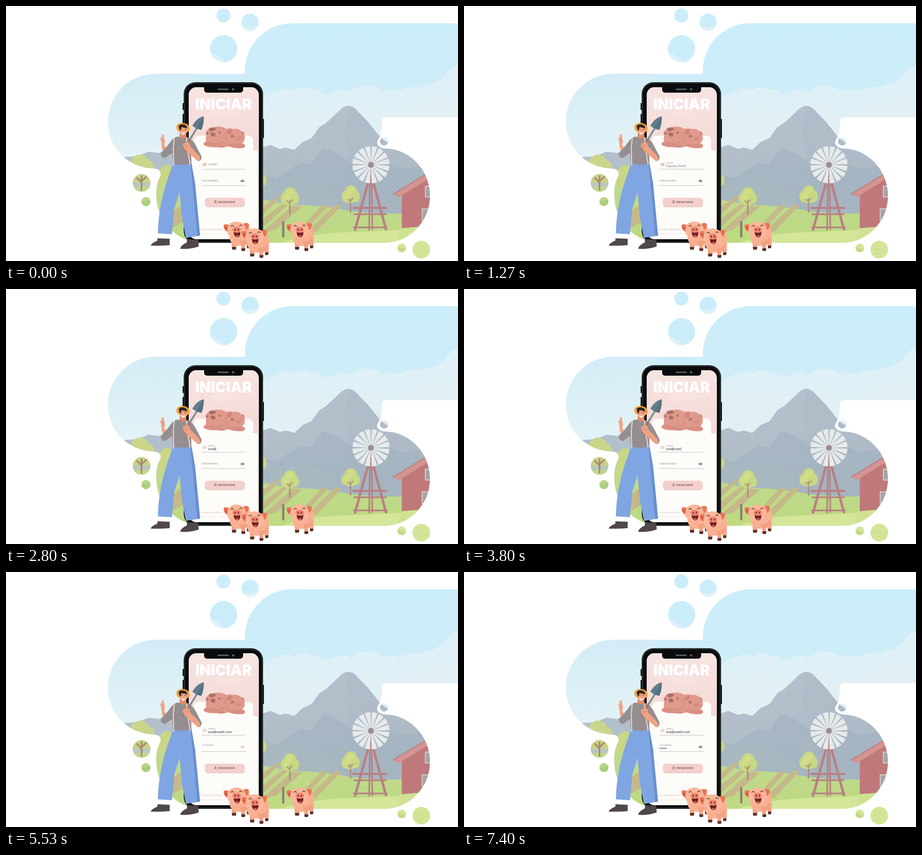
Write an HTML page that moves like this. It is 997 px wide and 562 px high and loops after 8000 ms.

```html
<!DOCTYPE html>
<html lang="es">
<head>
<meta charset="utf-8">
<title>Iniciar</title>
<style>
html,body{margin:0;width:100%;height:100%;overflow:hidden;background:#fff}
svg{display:block;width:100vw;height:100vh}
text{font-family:Roboto,"Liberation Sans",sans-serif}
.line{fill:none;stroke-linecap:round;stroke-linejoin:round}
</style>
</head>
<body>
<svg viewBox="0 0 997 562" preserveAspectRatio="none">
<defs>
  <clipPath id="blob">
    <path d="M997 38H632C574 38 527 85 527 143V149.500H330C272 149.500 225 197 225 255C225 308 263 350 314 357C332 359 343 358 341 374C331 392 331 408 332 426C336 482 382 522 437 522H832C889 522 935 476 935 418C935 361 890 316 840 314.500Q824 314 819 305C816 297 824 292 826 283Q829 270 829 254Q829 245 838 245H997Z"/>
    <circle cx="834" cy="298.500" r="9"/>
  </clipPath>
  <clipPath id="screenClip"><rect x="403" y="179" width="154.500" height="335" rx="17"/></clipPath>
  <clipPath id="bubbles">
    <circle cx="479.500" cy="21" r="15.500"/><circle cx="538.500" cy="36" r="19"/><circle cx="480" cy="94" r="30"/>
    <circle cx="299" cy="390" r="19.500"/><circle cx="308.500" cy="431" r="10"/>
    <circle cx="873" cy="533" r="9.500"/><circle cx="916" cy="537" r="19.500"/>
  </clipPath>
  <linearGradient id="sky" x2="0" y2="1"><stop stop-color="#cbedfa"/><stop offset=".5" stop-color="#ceedf8"/><stop offset="1" stop-color="#e3f2f7"/></linearGradient>
  <linearGradient id="mist" x2="0" y2="1"><stop stop-color="#dff1f8"/><stop offset="1" stop-color="#deeff5"/></linearGradient>
  <linearGradient id="leftSky" x2="0" y2="1"><stop stop-color="#d3ecf6"/><stop offset=".4" stop-color="#dbeff6"/><stop offset="1" stop-color="#e4f3f7"/></linearGradient>
  <linearGradient id="peak" x2="0" y2="1"><stop stop-color="#b6bfcd"/><stop offset="1" stop-color="#acbdc5"/></linearGradient>
  <linearGradient id="field" x2="0" y2="1"><stop stop-color="#c3d992"/><stop offset="1" stop-color="#bbd980"/></linearGradient>
  <linearGradient id="rose" x2="0" y2="1"><stop stop-color="#f7e4e1"/><stop offset="1" stop-color="#f4d9d6"/></linearGradient>
  <g id="tree">
    <path class="line" d="M0 34V6" stroke="#ab927c" stroke-width="3.500"/>
    <path d="M-20 4Q-22 -8 -13 -13Q-10 -24 0 -25Q12 -24 14 -13Q22 -7 20 5Q17 14 9 12Q0 18 -9 13Q-17 14 -20 4Z" fill="#c9d883"/>
    <path d="M-17 4Q-12 -9 0 -21Q8 -19 9 -12Q0 -8 -3 2Q-8 10 -17 4Z" fill="#d0dd89"/>
    <path class="line" d="M0 22V4M0 12L-6 5M0 10L6 3" stroke="#ab927c" stroke-width="2"/>
  </g>
  <g id="pig">
    <path d="M10 34V50H18V36ZM-12 30L-10 46H-2L1 30ZM21 28L23 43H30L31 20Z" fill="#f2a084"/>
    <path d="M10 45L11 51H18L19 45ZM-11 42L-10 48H-2L-1 42ZM22 39L23 45H29L30 39Z" fill="#5b3029"/>
    <path d="M-16 13Q-14 -3 9 -9Q30 -11 31 12Q32 37 15 39Q-10 43 -16 24Z" fill="#f9b092"/>
    <path d="M7 29Q23 31 27 17Q31 36 14 39Q7 39 7 29Z" fill="#f2a182"/>
    <path d="M-16 -6Q-29 -11 -29 -4Q-28 8 -18 9ZM13 -8Q22 -14 27 -8Q27 3 17 6Z" fill="#ec7355"/>
    <path d="M-20 -2L-27 -3Q-27 3 -20 5Z" fill="#d65a45"/>
    <path d="M-21 6Q-21 -13 -1 -14Q19 -13 20 5Q20 22 -1 23Q-20 22 -21 6Z" fill="#fab799"/>
    <path class="line" d="M-13 -3Q-10 -8 -7 -3M6 -4Q9 -9 12 -4" stroke="#4b2826" stroke-width="1.300"/>
    <path d="M-7 9Q0 12 8 9Q8 21 1 21Q-6 20 -7 9Z" fill="#6d2022"/>
    <path d="M-3 18Q1 14 5 18Q1 22 -3 18Z" fill="#e86463"/>
    <ellipse cy="4" rx="9.500" ry="6.500" fill="#ef8571"/>
    <ellipse cx="-3.500" cy="4" rx="1.600" ry="2.500" fill="#83373a"/><ellipse cx="3.500" cy="4" rx="1.600" ry="2.500" fill="#83373a"/>
  </g>
</defs>

<rect width="997" height="562" fill="#fff"/>

<g clip-path="url(#blob)">
  <rect x="220" y="30" width="777" height="300" fill="url(#sky)"/>
  <path d="M527 216Q548 204 567 206Q580 192 600 188Q616 177 638 186Q652 172 674 184Q690 181 700 194Q716 198 728 186Q750 182 758 191Q776 172 806 176Q823 178 829 190Q844 180 868 188Q890 175 917 179Q932 170 945 172Q960 160 968 157Q974 140 997 130V350H527Z" fill="url(#mist)"/>
  <path d="M560 240Q590 222 620 229Q655 216 690 230T760 226T820 228T890 220T997 205V330H560Z" fill="#e3f1f6" opacity=".8"/>
  <rect x="220" y="149" width="201" height="200" fill="url(#leftSky)"/>
  <path d="M225 345L260 333L289 331L315 321L338 324L362 309L403 314V420H225Z" fill="#b2c0cb"/>
  <path d="M560 314L583 306L604 315L617 312L636 317L654 300L674 291L691 267L706 258L740 226Q755 214 770 226L799 256L827 291L861 314L890 325L940 350V470H560Z" fill="url(#peak)"/>
  <path d="M756 220L770 226L799 256L827 291L861 314L890 325L940 350V440H770L752 412L764 380L745 350L758 318L745 282Z" fill="#aab6c3" opacity=".35"/>
  <path d="M560 372L596 380L650 345L672 350L700 313L733 325L768 352L800 360L840 345L872 360L935 350V480H560Z" fill="#a1b1be" opacity=".6"/>
  <path d="M560 384L600 391L640 381L700 400L730 421V475H560Z" fill="#a9bcbf" opacity=".5"/>
  <path d="M320 382Q350 360 403 374V530H320ZM558 426Q590 430 620 438Q700 439 760 452Q840 461 940 455V530H558Z" fill="url(#field)"/>
  <path d="M560 447L601 419L607 421L560 466ZM560 474L620 429L628 432L564 490ZM568 496L632 440L653 442L578 507ZM626 516L697 438L711 440L647 508ZM655 506L727 437L740 440L682 500Z" fill="#c5b98a"/>
  <path d="M560 506Q590 486 652 494Q720 508 780 497Q860 486 940 486V530H560Z" fill="#bedb82"/>
  <path d="M600 524Q660 503 740 499Q850 496 940 488V530H600Z" fill="#d4e69a"/>
  <path d="M403 430L372 450L350 474L365 490L403 470Z" fill="#c5b98a"/>
  <path d="M609 474H614V510H609Z" fill="#8f8074"/>
  <use href="#tree" x="626" y="424"/>
  <use href="#tree" x="760" y="420"/>
  <path d="M271 356Q274 333 291 328Q307 325 315 340Q329 345 328 362H271Z" fill="#cbd58a"/>
  <path d="M332 390Q336 352 356 350Q374 354 372 374Q367 399 345 398Z" fill="#c9d685"/>
  <ellipse cx="568" cy="384" rx="7" ry="12" fill="#c9d784"/>

  <g class="line" stroke="#b98084">
    <path d="M799 388L770 493M810 388L838 492" stroke-width="5.500"/>
    <path d="M803 360L801 493M806 360L808 492" stroke-width="3.500"/>
    <path d="M766 445H839" stroke-width="4.500"/>
    <path d="M768 459H838M767 488H840" stroke-width="3.500"/>
  </g>
  <circle cx="805" cy="350" r="24" fill="none" stroke="#e6eaea" stroke-width="34" pathLength="48" stroke-dasharray="2.300 .7" transform="rotate(3 805 350)"/>
  <circle cx="805" cy="350" r="6" fill="#a08a91"/>

  <path d="M873 414L940 374V490H873Z" fill="#bf797b"/>
  <path d="M853 415L934 366L940 376L867 421Z" fill="#d49491"/>
  <path d="M853 415L934 366" stroke="#bd7679" stroke-width="2"/>
  <path d="M925 397H940V421H925ZM918 447H935V473H918Z" fill="#a5a5a6" stroke="#dccdc8" stroke-width="2"/>
  <path d="M870 490L940 484V530H860Z" fill="#cfe292"/>
</g>

<g clip-path="url(#bubbles)">
  <rect x="440" width="130" height="130" fill="#cbedfa"/>
  <path d="M519 49Q529 43 537 49Q545 42 558 44V58H519ZM450 109Q458 102 466 111Q473 112 482 124H450Z" fill="#dff1f8"/>
  <rect x="278" y="369" width="42" height="42" fill="#bac7bf"/>
  <path d="M278 369H320V388Q310 393 299 387Q286 394 278 385Z" fill="#c8d286"/>
  <path d="M278 401Q300 396 320 400V412H278Z" fill="#c1d78a"/>
  <path class="line" d="M299 405V375M299 389L289 379M299 386L309 377" stroke="#a9866f" stroke-width="3.500"/>
  <rect x="296" y="420" width="24" height="22" fill="#b9d586"/>
  <path d="M296 434L320 425V442H296Z" fill="#abcd7e"/>
  <rect x="860" y="515" width="80" height="45" fill="#d2e597"/>
  <path d="M862 530L885 537V545H862Z" fill="#c3da88"/>
  <path class="line" d="M902 535L914 538L919 534M911 546L923 543" stroke="#c3d587" stroke-width="1"/>
</g>

<path d="M392 214H389.500V229H392ZM392 238H389.500V258H392ZM567 249H569V291H567Z" fill="#17191b"/>
<rect x="392" y="168" width="175" height="354" rx="26" fill="#090b0d"/>
<rect x="393.800" y="169.800" width="171.400" height="350.400" rx="24.500" fill="none" stroke="#555b5f" stroke-width="1"/>
<g clip-path="url(#screenClip)">
  <rect x="403" y="179" width="155" height="335" fill="#fdfcf9"/>
  <rect x="403" y="179" width="155" height="139" fill="url(#rose)"/>
  <rect x="414" y="286" width="131" height="50" rx="10" fill="#fdfcf9"/>
  <path d="M437 178H523V184Q523 191 516 191H444Q437 191 437 184Z" fill="#090b0d"/>
  <text x="480" y="227.500" text-anchor="middle" style="font:900 32.500px Inter,sans-serif" fill="#fff">INICIAR</text>
  <text id="sub" x="484" y="245" text-anchor="middle" style="font:700 16px Inter,sans-serif" fill="none" stroke="#fff" stroke-width=".8" stroke-dasharray="1 1.500">SESIÓN</text>
</g>
<path class="line" d="M468 183.500H490" stroke="#5b6064" stroke-width="3"/>
<circle cx="501" cy="183.500" r="2.500" fill="#5b6064"/>

<path d="M441 299Q440 290 442 284Q438 280 442 276Q447 268 458 267Q473 263 487 271Q494 268 501 271Q512 269 519 276Q527 275 526 285Q529 297 521 302L527 306Q529 311 523 313Q505 315 490 309Q480 314 466 311Q449 313 437 307Q433 302 441 299Z" fill="#e09a8c"/>
<path d="M447 299Q437 300 436 304Q441 309 455 309L470 312Q482 312 483 308L466 302ZM486 304Q505 302 524 305Q529 309 523 312Q505 314 490 309Z" fill="#d88f83"/>
<path d="M447 271Q453 265 464 270Q460 277 450 276ZM451 281Q456 276 461 281Q464 287 458 288Q451 288 451 281ZM442 280Q444 276 447 279Q446 284 443 284Z" fill="#a97069"/>
<circle cx="471" cy="279" r="2.500" fill="#a97069"/><circle cx="499" cy="287" r="3.500" fill="#b27a72"/>
<path d="M486 279Q491 270 499 272L497 281Q491 286 486 279ZM520 278Q524 275 525 280L522 285Z" fill="#d0867c"/>
<ellipse cx="513" cy="293" rx="6.500" ry="4" fill="#d98f86"/>
<path class="line" d="M503 288H506M516 287H519M510 292V294M515 292V294M485 282Q482 294 490 301M470 303Q479 297 484 304" stroke="#a96d66" stroke-width=".7"/>

<g id="mail"><rect x="434" y="346" width="8" height="6.500" rx=".8"/><path d="M434.500 347L438 350L441.500 347" fill="none" stroke="#fff" stroke-width=".7"/></g>
<path d="M431 359.700H529M431 395.700H529" stroke="#bdbcba" stroke-width="1"/>
<g id="mailLabel"><text font-size="5.700" fill="#929292">CORREO</text></g>
<text id="mailHint" x="445.500" y="355" font-size="7.300" fill="#858585">Ingrese Owelt</text>
<text id="mailText" x="445.500" y="355" font-size="7.400" fill="#333"></text>
<g id="passLabel"><text font-size="5.700" fill="#929292">CONTRASEÑA</text></g>
<text id="passHint" x="431" y="391" font-size="7.200" fill="#858585">Ingrese Contraseña</text>
<g id="dots" fill="#333"></g>
<rect id="caret" width=".8" height="8" fill="#777"/>
<g id="eye" class="line" stroke-width="1.200"><path d="M517.500 385.500Q521.500 380.500 525.500 385.500Q521.500 390 517.500 385.500Z"/><circle cx="521.500" cy="385.500" r="1.300"/></g>
<rect x="439" y="425" width="88" height="18.500" rx="7" fill="#dccbc9"/>
<rect x="438.500" y="422.500" width="88" height="19.500" rx="7" fill="#f5cfcc"/>
<g class="line" stroke="#54494a" stroke-width=".8"><circle cx="462" cy="430.300" r="1.600"/><path d="M459.300 435Q460 432.800 462 432.800T464.700 435"/></g>
<text x="467.800" y="434.200" style="font:700 4.600px 'Noto Serif',serif" fill="#54494a">INICIAR SESION</text>
<text id="account" x="431" y="494.300" font-size="4.050" fill="#d99b99">NO TENGO UNA CUENTA?</text>
<path d="M425 501.500H490" stroke="#e4e1de" stroke-width=".7"/>

<!-- farmer -->
<path d="M334 512L361 513V527Q341 529 319 528Q320 523 334 517ZM399 514L424 515L425 530Q406 537 384 535Q386 527 399 521Z" fill="#50474a"/>
<path d="M369 346H409L417 391L428 506L397 511L388 466L383 410L371 447L366 503L335 501Q336 445 355 386Z" fill="#7fa5e2"/>
<path d="M407 346H409L417 391L428 506L422 507L414 420Z" fill="#678fce"/>
<path d="M350 332L344 313L342 298L340 289L343 291L344 282L348 284L349 292Q352 296 349 306L356 318L360 328Z" fill="#f0a384"/>
<path d="M377 288Q367 291 361 302L341 326Q343 335 351 335L366 324L368 347Q388 354 409 346L408 316L415 324Q421 335 424 342Q433 340 431 331L417 304Q410 293 400 289Z" fill="#958e90"/>
<path d="M366 324L372 307M408 316L405 307" class="line" stroke="#7f797b" stroke-width="1"/>
<path d="M371 291L369 315L370 351M398 290L402 324L406 349" class="line" stroke="#f1d9c7" stroke-width="2.200"/>
<path d="M383 280V289Q391 296 398 288L397 280Z" fill="#df8969"/>
<path d="M376 270Q374 261 385 258Q400 256 405 268Q407 275 400 278L385 279Q378 276 376 270Z" fill="#f5a531"/>
<path d="M383 268Q388 262 398 267L400 276Q397 287 389 286Q383 282 383 270Z" fill="#f0a384"/>
<path d="M381 264Q385 260 392 261Q399 262 400 270L393 268L387 267L385 275Q381 271 381 264Z" fill="#2b2529"/>
<path d="M387 272L389 271M394 272L397 272" class="line" stroke="#302a2d"/>
<path d="M386 278Q391 281 396 278Q393 284 388 282Z" fill="#fff"/>
<path d="M423 342L402 323L392 313L390 304L397 301L405 308L424 328Q429 333 428 339Z" fill="#f0a384"/>
<path d="M392 316L423 266" class="line" stroke="#b06d52" stroke-width="3.500"/>
<path d="M407 292L423 266" class="line" stroke="#768d99" stroke-width="3.500"/>
<path d="M436 243Q421 246 411 264L420 270L431 273Q437 258 436 243Z" fill="#607d8b"/>
<path d="M436 243L420 270L431 273Q437 258 436 243Z" fill="#54717f"/>
<path d="M390 305L399 299L406 304L403 314L393 315Z" fill="#f0a384"/>
<path d="M393 306L402 308M394 310L401 312" class="line" stroke="#cf7e62" stroke-width=".8"/>

<use href="#pig" x="509" y="489"/>
<use href="#pig" x="549" y="504"/>
<use href="#pig" x="648" y="489"/>
</svg>
<script>
const $ = id => document.getElementById(id);
const LOOP = 8000, ADDRESS = 'oca@owelt.com';
const KEYS = [1600, 1730, 2000, 2800, 3130, 3330, 3800, 3930, 4130, 4330, 4670, 4800, 5000];
const DOTS = [5870, 5930, 6000, 6200, 6330, 6530];
const count = (list, t) => list.filter(k => t >= k).length;
const ramp = (t, a, b) => Math.max(0, Math.min(1, (t - a) / (b - a)));
const within = (t, a, b) => t >= a && t < b;

const dots = DOTS.map((_, i) => {
  const c = document.createElementNS('http://www.w3.org/2000/svg', 'circle');
  c.setAttribute('cx', 432.3 + i * 2.6);
  c.setAttribute('cy', 388.5);
  c.setAttribute('r', 1);
  $('dots').append(c);
  return c;
});

function floatLabel(id, x, y, p) {
  $(id).setAttribute('transform', `translate(${x} ${y - 4.2 * p}) scale(${1 - .27 * p})`);
}

function draw(t) {
  const typed = count(KEYS, t), hidden = count(DOTS, t);
  floatLabel('mailLabel', 445.5, 351.2, ramp(t, 700, 930));
  floatLabel('passLabel', 431, 387.4, ramp(t, 5370, 5530));
  $('mailHint').setAttribute('opacity', typed ? 0 : ramp(t, 900, 1200));
  $('passHint').setAttribute('opacity', hidden ? 0 : ramp(t, 5600, 5730));
  $('mailText').textContent = ADDRESS.slice(0, typed);
  dots.forEach((d, i) => d.setAttribute('opacity', i < hidden ? 1 : 0));

  const inMail = within(t, 1600, 2330) || within(t, 3130, 5400);
  const inPass = within(t, 6200, 6930);
  const x = inPass ? 432 + hidden * 2.6 : 446 + $('mailText').getComputedTextLength();
  $('caret').setAttribute('x', x);
  $('caret').setAttribute('y', inPass ? 384.5 : 348.5);
  $('caret').setAttribute('opacity', inMail || inPass ? 1 : 0);

  const late = t >= 2000;
  $('mail').setAttribute('fill', late ? '#ecd0cd' : '#ebb9b7');
  $('account').setAttribute('opacity', late ? .8 : 1);
  $('sub').setAttribute('opacity', within(t, 400, 2000) ? .5 : .75);
  $('eye').setAttribute('stroke', within(t, 5400, 6930) ? '#e9bfbd' : '#77797b');
}

function tick() {
  draw(performance.now() % LOOP);
  requestAnimationFrame(tick);
}
tick();
</script>
</body>
</html>
```
